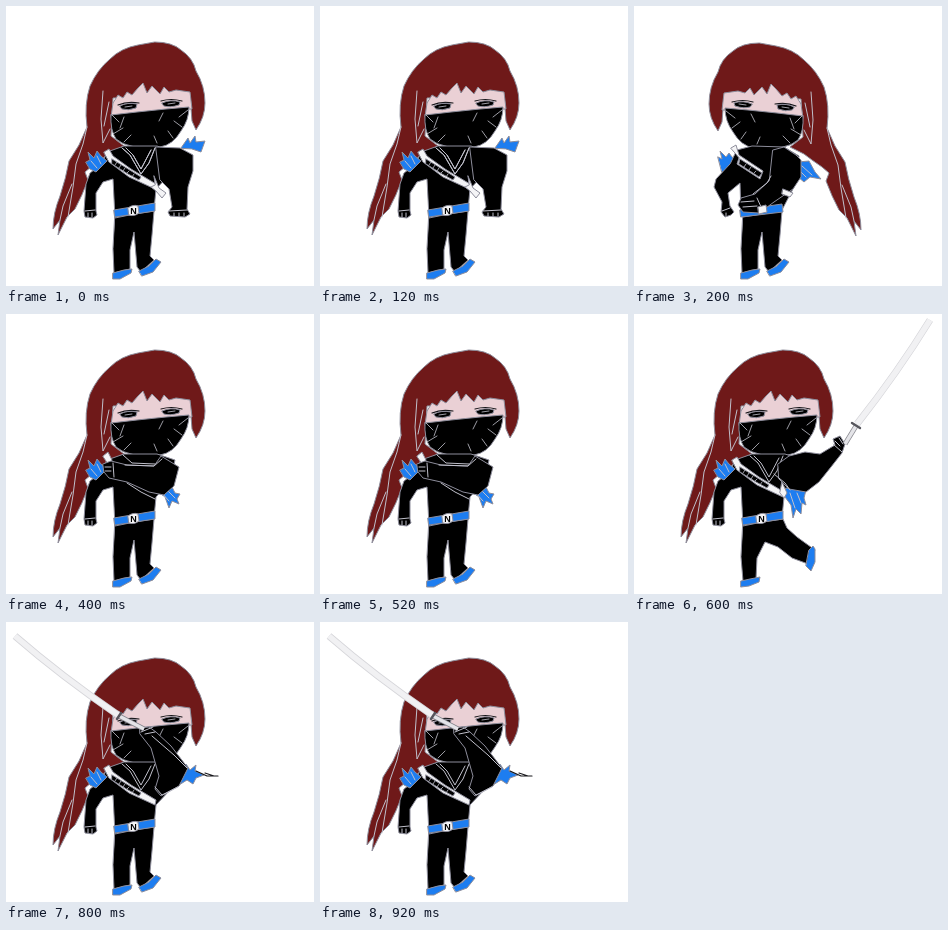
These frames come from a looping animation (308x280 px, 1 s). An HTML page:

```html
<!DOCTYPE html>
<html lang="en">
<head>
<meta charset="utf-8">
<title>Ninja sword swing</title>
<style>
html, body { margin: 0; width: 100%; height: 100%; overflow: hidden; background: #fff; }
svg { display: block; width: 308px; height: 280px; }
path { stroke: #8d8d9b; stroke-width: 1; stroke-linejoin: round; stroke-linecap: round; fill: none; }
.hair { fill: #6f1919; }
.skin { fill: #ead0d5; }
.suit { fill: #000; }
.blue { fill: #1d7df0; }
.pale { fill: #f4f4f6; }
.line { stroke: #c0c0cb; }
.fine { stroke: #c4c4ce; stroke-width: .8; }
.dark { stroke: #17171b; stroke-width: 1.2; }
text { font: bold 9px "Liberation Sans", Arial, sans-serif; text-anchor: middle; }
[data-on] { opacity: 0; }
</style>
</head>
<body>
<svg viewBox="0 0 308 280">
<defs>
  <g id="head">
    <path class="hair" d="M149 36Q166 36 175 44Q187 52 190 65Q199 80 199 97Q199 111 190 124L186 115L184 90L107 92L105 130L118 140L104 147L96 153L86 160L79 166L82 174Q76 190 69 203L61 211L52 229L54 214L47 223Q47 207 54 190Q60 172 63 155L73 139L81 121Q78 98 84 80Q91 64 104 53Q115 42 132 39Z"/>
    <path class="line" d="M81 121L77 138L70 158L67 181L62 211M97 85L95 113L97 137L104 123M66 178L57 200L54 214M103 96L98 120"/>
    <path class="skin" d="M105 111L107 97L112 89L117 92L121 86L126 89L132 82L137 77L141 87L146 80L154 88L158 81L163 86L170 84L184 86L186 103Q160 103 130 107Z"/>
    <path class="suit" d="M105 109L131 106L160 103L183 101Q183 114 175 125Q167 139 154 141Q122 144 110 133Q104 124 105 109Z"/>
    <path class="fine" d="M106 109L113 116M118 111L114 122M107 128L117 122M118 136L125 129M151 137L148 130M167 132L162 125M176 121L168 115M182 104L173 111M157 107L153 115"/>
    <path class="dark" d="M112 99Q121 95 133 97M155 95Q165 92 176 95"/>
    <path class="suit" d="M114 100Q121 96 131 98L130 102Q122 105 116 103Z"/>
    <path class="suit" d="M156 97Q165 93 174 96L173 99Q164 102 158 100Z"/>
    <path class="fine" d="M119 101L126 100M162 98L169 97"/>
  </g>
  <g id="guard">
    <path class="blue" d="M80 156L84 154L82 146L88 152L91 145L95 150L101 155L90 166L84 163Z"/>
    <path class="line" d="M85 155L91 162M91 150L95 158"/>
  </g>
  <g id="torso">
    <path class="suit" d="M101 146L118 140L151 140L169 146L164 168L150 183L148 204L109 212L107 173L97 176L90 187L90 205L91 209L87 212L79 211L78 205L80 178L84 167L96 158Z"/>
    <path class="line" d="M79 205L89 204M82 207L82 211M86 207L86 211"/>
  </g>
  <g id="strap">
    <path class="pale" d="M98 146L103 143L107 150L125 163L150 178L149 183L123 171L103 156Z"/>
    <path class="suit" d="M106 153L127 166L135 171L133 174L122 168L106 158Z"/>
    <path class="fine" d="M111 156L109 159M115 159L113 162M119 162L117 165M123 165L121 167M128 168L126 171"/>
  </g>
  <g id="collar">
    <path class="line" d="M116 142L124 149L135 168L143 157L149 142M120 142L127 149L135 163L145 144"/>
  </g>
  <g id="belt">
    <path class="blue" d="M108 204L149 197L149 205L109 211Z"/>
    <path class="pale" d="M122 202Q127 198 132 200L133 207Q128 211 123 209Z"/>
    <text x="127.5" y="208">N</text>
  </g>
  <g id="stand">
    <path class="suit" d="M109 211L148 205L146 229L144 250L148 254L135 266L131 261L128 226L124 244L124 263L108 267L107 243Z"/>
    <path class="blue" d="M107 267L118 264L126 263L125 267L114 273L107 273Z"/>
    <path class="blue" d="M133 265L143 260L150 253L155 256L147 266L136 270Z"/>
  </g>
  <g id="step">
    <path class="suit" d="M109 211L149 205L153 214L163 223L181 236L174 250L158 244L144 233L131 228L123 244L122 265L109 267L107 243Z"/>
    <path class="blue" d="M107 267L116 265L126 263L125 268L115 272L107 273Z"/>
    <path class="blue" d="M175 236L179 232L181 235L181 248L177 257L172 252Z"/>
  </g>
</defs>

<use href="#head" data-on="0 2 3 4"/>
<use href="#head" data-on="1" transform="translate(274 1) scale(-1 1)"/>
<use href="#stand" data-on="0 1 2 4"/>
<use href="#step" data-on="3"/>
<use href="#torso" data-on="0 2 3 4"/>
<use href="#strap" data-on="0 3 4"/>
<use href="#collar" data-on="0 3 4"/>
<use href="#belt" data-on="0 2 3 4"/>
<use href="#guard" data-on="0 2 3 4"/>

<g data-on="0">
  <path class="blue" d="M175 142L182 132L184 137L189 130L190 136L199 135L195 146L186 143Z"/>
  <path class="suit" d="M150 141L174 142L187 149L187 165L182 181L181 203L184 208L179 211L164 210L162 206L166 201L163 183L154 174Z"/>
  <path class="line" d="M163 205L181 204M168 207L168 210M173 207L173 210M178 207L178 210"/>
  <path class="pale" d="M148 170L153 182L160 187L156 192L150 185L145 181L149 179Z"/>
  <use href="#collar"/>
</g>

<g data-on="1">
  <path class="blue" d="M84 151L88 153L86 145L92 151L95 147L98 151L104 155L95 165L88 166Z"/>
  <path class="blue" d="M164 156L175 155L181 166L187 173L176 171L170 176L164 171Z"/>
  <path class="line" d="M168 160L178 169M166 165L172 171"/>
  <path class="suit" d="M103 144L118 140L150 141L165 150L160 181L148 204L107 210L106 177L94 187L96 200L100 206L97 209L91 211L87 206L88 196L80 181L82 173L96 158Z"/>
  <path class="line" d="M88 205L96 202M92 207L92 210"/>
  <path class="pale" d="M97 142L102 139L105 149L129 165L126 173L103 158L105 152Z"/>
  <path class="suit" d="M106 153L128 167L125 171L105 158Z"/>
  <path class="fine" d="M112 158L110 161M117 161L115 164M122 165L120 167"/>
  <path class="blue" d="M106 204L148 198L149 206L107 211Z"/>
  <path class="suit" d="M139 144L150 141L162 149L167 154L167 171L159 183L140 196L125 207L109 206L104 199L107 192L121 188L135 175Z"/>
  <path class="line" d="M137 170L133 177L119 188M107 196L120 195M109 201L123 200M123 192L128 203"/>
  <path class="pale" d="M149 183L159 187L156 191L148 188Z"/>
  <path class="pale" d="M124 201L132 199L133 206L125 208Z"/>
</g>

<g data-on="2">
  <path class="blue" d="M149 176L166 173L169 179L174 180L171 185L173 190L166 187L163 194L159 183Z"/>
  <path class="line" d="M155 178L163 187M162 177L169 184"/>
  <path class="pale" d="M97 142L102 138L106 146L103 158L98 157L101 149Z"/>
  <path class="suit" d="M97 150L105 147L121 151L148 152L155 142L173 153L168 172L158 181L143 178L121 168L103 164L98 158Z"/>
  <path class="line" d="M107 149L108 163M99 153L105 153M99 157L105 157M119 151L148 152L156 145M117 141L126 149L149 150"/>
  <path class="line" d="M121 169L135 178L149 185"/>
</g>

<g data-on="3">
  <path class="blue" d="M152 174L172 176L170 184L172 191L168 189L167 200L162 195L159 204L157 191L151 183Z"/>
  <path class="line" d="M156 179L161 194M163 179L167 189"/>
  <path class="suit" d="M144 150L155 142L171 138L186 140L201 131L199 125L206 122L211 130L208 139L197 153L185 168L172 178L155 175L145 165Z"/>
  <path class="line" d="M199 130L208 138M201 127L206 132M205 124L209 130M140 160L151 169L156 176"/>
  <path class="pale" d="M148 168L153 179L150 184L146 179Z"/>
</g>

<g data-on="4">
  <path class="blue" d="M174 151L180 142L184 148L190 143L189 149L198 153L190 156L187 162L181 158L173 163Z"/>
  <path class="dark" d="M190 149L201 154L212 154M199 151L208 154"/>
  <path class="suit" d="M134 106L143 105L150 110L165 124L182 146L173 164L155 174L149 167L153 154L145 126L134 112Z"/>
  <path class="line" d="M135 110L147 105M139 112L149 110M146 114L168 133L181 146M149 165L156 173L172 165"/>
</g>

<g id="swords"></g>
</svg>
<script>
const STEP = 200, COUNT = 5;
const NS = "http://www.w3.org/2000/svg";

// Blade as a curved strip from tip to guard, then a grip.
function addSword(pose, blade, grip, guard) {
  const g = document.createElementNS(NS, "g");
  g.dataset.on = pose;
  const strokes = [
    [blade, "#d6d6da", 7, "butt"],
    [blade, "#f1f1f3", 5.6, "butt"],
    [grip, "#85858c", 5, "butt"],
    [grip, "#e4e4e8", 3.4, "butt"],
    [guard, "#55555c", 2.4, "round"]
  ];
  for (const [d, stroke, width, cap] of strokes) {
    const p = document.createElementNS(NS, "path");
    p.setAttribute("d", d);
    p.style.cssText = `stroke:${stroke};stroke-width:${width};stroke-linecap:${cap}`;
    g.append(p);
  }
  document.getElementById("swords").append(g);
}
addSword(3, "M296 6Q264 58 223 110", "M222 112L211 130", "M218 109L226 114");
addSword(4, "M9 14Q55 54 112 93", "M113 94L138 107", "M115 91L111 97");

for (const el of document.querySelectorAll("[data-on]")) {
  const poses = el.dataset.on.split(" ").map(Number);
  const steps = Array.from({ length: COUNT + 1 }, (_, i) => ({
    offset: i / COUNT,
    opacity: poses.includes(i % COUNT) ? 1 : 0,
    easing: "steps(1, end)"
  }));
  const anim = el.animate(steps, { duration: STEP * COUNT, iterations: Infinity });
  anim.startTime = 0;
}
</script>
</body>
</html>
```
